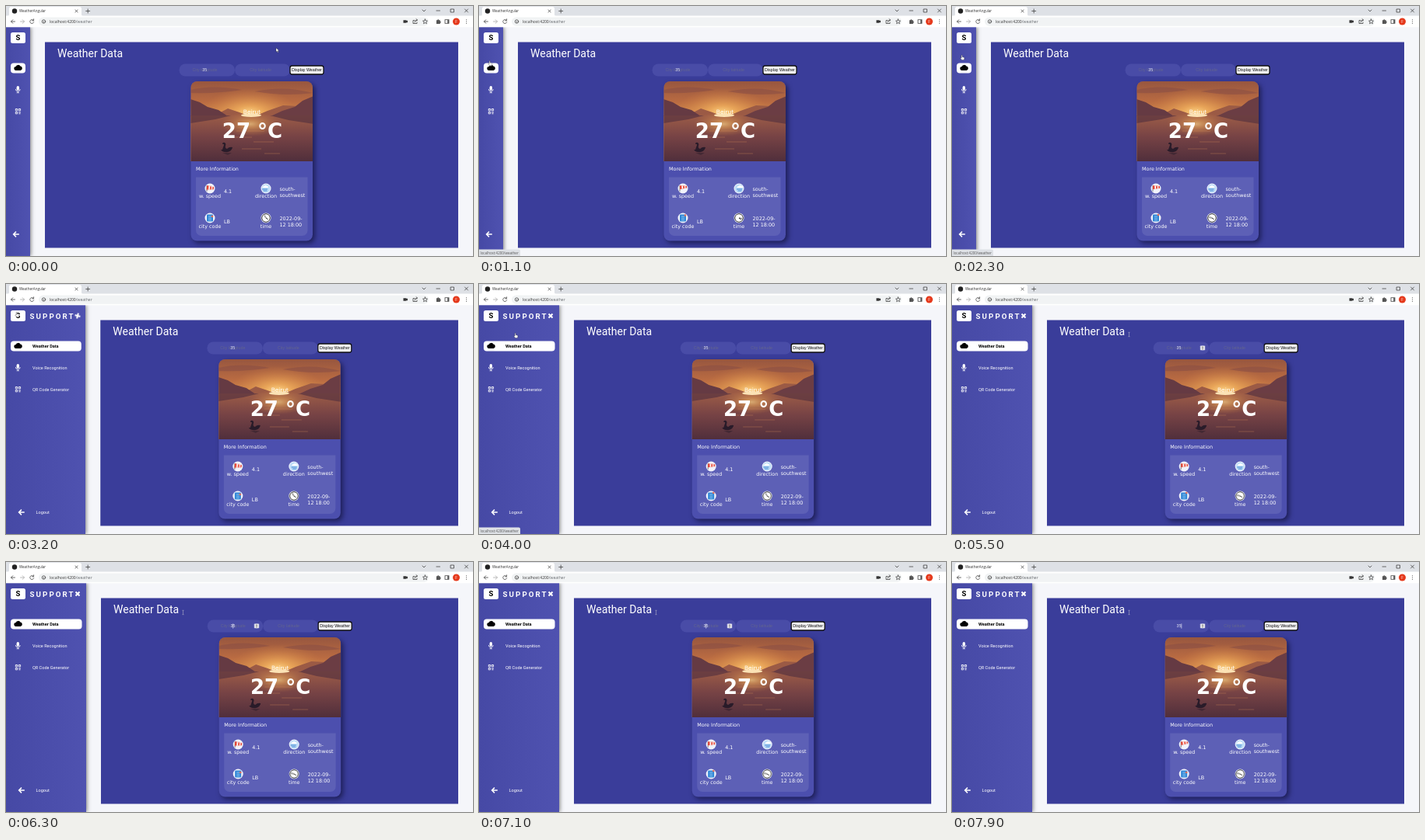
An HTML page that plays this animation: 600 by 322 pixels, repeating every 8 s.

```html
<!DOCTYPE html>
<html lang="en">
<head>
<meta charset="utf-8">
<title>WeatherAngular</title>
<style>
/* --open runs from 0 (sidebar collapsed) to 1 (expanded) */
@property --open { syntax: "<number>"; inherits: true; initial-value: 0; }

html, body { margin: 0; width: 100%; height: 100%; overflow: hidden; }
#stage {
  position: relative; width: 600px; height: 322px; overflow: hidden;
  background: #f5f6fa; animation: open 8s linear infinite;
}
svg { position: absolute; left: 0; top: 0; display: block; }
text { white-space: pre; }

@keyframes open {
  0%, 33.5% { --open: 0; animation-timing-function: ease; }
  41%, 100% { --open: 1; }
}

/* page */
.panel { x: calc(50px + 72px * var(--open)); width: calc(531px - 72px * var(--open)); }
.heading { transform: translateX(calc(72px * var(--open))); font: 14px Roboto, sans-serif; fill: #fff; }
.middle { transform: translateX(calc(36.2px * var(--open))); }
.form { font: 5.3px "Liberation Sans", Arial, sans-serif; text-anchor: middle; }
.card { filter: drop-shadow(3px 3px 3px rgba(0, 0, 20, .5)); }
.info { font: 6.4px "DejaVu Sans", Verdana, sans-serif; fill: #fff; }
.mid { text-anchor: middle; }

/* sidebar */
#side {
  position: absolute; left: 0; top: 27px; height: 295px; overflow: hidden;
  width: calc(31px + 72px * var(--open));
  background: linear-gradient(90deg, #4649a5, #4f52b0);
}
#shade {
  position: absolute; left: 0; top: 27px; height: 295px;
  width: calc(31px + 72px * var(--open));
  box-shadow: 1px 0 5px rgba(0, 0, 0, .5);
}
.pill { width: calc(19px + 72.5px * var(--open)); }
.labels { opacity: var(--open); font: 5.55px Roboto, sans-serif; fill: #fff; }
.back { transform: translateX(calc(7px * var(--open))); }
.close { transform-origin: 92px 41px; animation: spin 8s linear infinite; }
@keyframes spin {
  0%, 33.5% { transform: rotate(-180deg); animation-timing-function: ease-out; }
  43.5%, 100% { transform: none; }
}

/* browser */
.ui { font: 5px "Open Sans", "Noto Sans", sans-serif; fill: #333; }
.line { fill: none; stroke: #444; stroke-width: .8; stroke-linecap: round; }
.status { animation: status 8s step-end infinite; }
@keyframes status {
  0% { opacity: 0; } 11.25% { opacity: 1; } 33.5% { opacity: 0; }
  46.25% { opacity: 1; } 58.5%, 100% { opacity: 0; }
}

/* number field */
.hint { animation: hint 8s step-end infinite; }
@keyframes hint { 0% { opacity: 1; } 92.5%, 100% { opacity: 0; } }
.spinner { animation: spinner 8s step-end infinite; }
@keyframes spinner { 0% { opacity: 0; } 60%, 100% { opacity: 1; } }
.first { animation: first 8s step-end infinite; }
@keyframes first { 0% { opacity: 0; } 92.5% { opacity: 1; } 95%, 100% { opacity: 0; } }
.both { animation: both 8s step-end infinite; }
@keyframes both { 0% { opacity: 0; } 95%, 100% { opacity: 1; } }
.caret { animation: caret 8s step-end infinite; }
@keyframes caret {
  0% { opacity: 0; transform: none; }
  61.25% { opacity: 1; } 67.5% { opacity: 0; }
  73.75% { opacity: 1; } 80% { opacity: 0; }
  86.25% { opacity: 1; transform: none; }
  92.5% { opacity: 1; transform: translateX(1.6px); }
  95%, 100% { opacity: 1; transform: translateX(3.1px); }
}

/* badge icons */
.hand { transform-origin: 334px 273px; animation: turn .8s linear infinite; }
@keyframes turn { from { transform: rotate(-30deg); } to { transform: rotate(330deg); } }
.sock { transform-origin: 258px 233px; animation: wave 1.6s ease-in-out infinite alternate; }
@keyframes wave { from { transform: rotate(6deg); } to { transform: rotate(-6deg) scaleY(.8); } }
.gust { animation: gust 1s ease-in-out infinite alternate; }
@keyframes gust { from { transform: translateX(-1px); } to { transform: translateX(1px); } }
.pin { animation: hop .8s ease-in-out infinite alternate; }
@keyframes hop { from { transform: translateY(1px); } to { transform: translateY(-1px); } }

/* pointer */
.pointer { animation: move 8s ease-in-out infinite; }
@keyframes move {
  0%, 1.25% { transform: translate(347px, 54px); }
  11.25% { transform: translate(13px, 71px); }
  22.5% { transform: translate(13px, 66px); }
  28.75%, 30% { transform: translate(12px, 63px); }
  33.5% { transform: translate(13px, 36px); }
  41.25% { transform: translate(13px, 36px); }
  46.25% { transform: translate(38px, 62px); }
  50%, 57.5% { transform: translate(46px, 63px); }
  61.25% { transform: translate(290px, 80px); }
  67%, 100% { transform: translate(227px, 62px); }
}
.arrow { animation: arrow 8s step-end infinite; }
@keyframes arrow { 0% { opacity: 1; } 10% { opacity: 0; } 58.5% { opacity: 1; } 60%, 100% { opacity: 0; } }
.finger { animation: finger 8s step-end infinite; }
@keyframes finger { 0% { opacity: 0; } 10% { opacity: 1; } 58.5%, 100% { opacity: 0; } }
.beam { animation: beam 8s step-end infinite; }
@keyframes beam { 0% { opacity: 0; } 60%, 100% { opacity: 1; } }
</style>
</head>
<body>
<div id="stage">

<svg width="600" height="322" viewBox="0 0 600 322">
  <defs>
    <linearGradient id="sky" x1="0" y1="0" x2="0" y2="1">
      <stop offset="0" stop-color="#97563f"/>
      <stop offset=".25" stop-color="#b96b42"/>
      <stop offset=".42" stop-color="#d28a4c"/>
    </linearGradient>
    <linearGradient id="lake" x1="0" y1="0" x2="0" y2="1">
      <stop offset="0" stop-color="#9c5c47"/>
      <stop offset=".45" stop-color="#774345"/>
      <stop offset="1" stop-color="#4f2e3b"/>
    </linearGradient>
    <radialGradient id="glow">
      <stop offset="0" stop-color="#ffd98a"/>
      <stop offset=".3" stop-color="#f0ae5c" stop-opacity=".8"/>
      <stop offset="1" stop-color="#d08042" stop-opacity="0"/>
    </radialGradient>
    <clipPath id="frame"><path d="M237.500 200V105a8 8 0 0 1 8-8h140.500a8 8 0 0 1 8 8V200z"/></clipPath>
  </defs>

  <rect class="panel" y="46.500" height="265" fill="#3a3d9a"/>
  <text class="heading" x="66" y="66">Weather Data</text>

  <g class="middle">
    <g class="form">
      <g fill="#494ca7">
        <rect x="222.500" y="74.500" width="71.500" height="16" rx="8"/>
        <rect x="294" y="74.500" width="71" height="16" rx="8"/>
      </g>
      <g fill="#62648f">
        <text class="hint" x="255.500" y="84.300">City longitude</text>
        <text x="327" y="84.300">City latitude</text>
      </g>
      <g class="spinner">
        <rect x="282.800" y="79.600" width="6" height="5.600" rx=".6" fill="#f3f3f6"/>
        <path d="M284.400 81.900l1.400-1.300 1.400 1.300zM284.400 83l1.400 1.300 1.400-1.300z" fill="#444"/>
      </g>
      <g fill="#e4e5f5">
        <text class="first" x="255.300" y="84.300">3</text>
        <text class="both" x="255.300" y="84.300">35</text>
      </g>
      <rect class="caret" x="255.300" y="79.400" width=".7" height="6.200" fill="#e4e5f5"/>
      <rect x="365" y="77" width="43" height="11" rx="2.500" fill="#f2f2f4" stroke="#111" stroke-width="1.300"/>
      <text x="386.500" y="84.300" fill="#111">Display Weather</text>
    </g>

    <rect class="card" x="237.500" y="97" width="156.500" height="205.500" rx="8" fill="#4c4fae"/>

    <g clip-path="url(#frame)">
      <rect x="237" y="97" width="158" height="104" fill="url(#sky)"/>
      <ellipse cx="313" cy="138" rx="62" ry="32" fill="url(#glow)"/>
      <g fill="#8a4f45" opacity=".6">
        <path d="M237 108q30-7 66 0q-30 5-66 4z"/>
        <path d="M320 110q38-8 74 2q-36 5-74-2z"/>
      </g>
      <path d="M268 141l17-9 15 5 10 4zM322 141l14-6 20-7 38 2v13z" fill="#9b5a45"/>
      <path d="M237 120l12 4 10 6 14 4 12 8h-48z" fill="#653a43"/>
      <path d="M395 116l-14 6-10 8-16 5-15 7h55z" fill="#6b3d44"/>
      <rect x="237" y="141" width="158" height="60" fill="url(#lake)"/>
      <ellipse cx="314" cy="152" rx="38" ry="16" fill="url(#glow)" opacity=".65"/>
      <ellipse cx="315" cy="140.800" rx="13" ry="2.200" fill="#fbe2b4"/>
      <path d="M237 141h52l-20 5-32 5zM395 141h-56l24 6 32 5z" fill="#5b343f" opacity=".75"/>
      <g stroke="#d78f59" stroke-width=".7" opacity=".5">
        <path d="M296 161h36M288 169h28M318 175h26M303 184h25M332 190h20"/>
      </g>
      <path d="M276 185q3 4 9 3q5-1 6-6q-4-1-7 2q-3-1-2-4q1-3-1-4q-3-1-3 2q2-1 2 1q-1 3-2 6z" fill="#291b29"/>
      <path d="M278 189h12l-5 3z" fill="#3a2430" opacity=".7"/>
    </g>

    <g class="info">
      <g class="mid">
        <text x="316" y="139" font-size="7.400">Beirut</text>
        <text x="316.500" y="169.500" font-size="26" font-weight="bold">27 °C</text>
      </g>
      <text x="244" y="212">More Information</text>
      <path d="M244 220.500H387.500V289a7 7 0 0 1-7 7H251a7 7 0 0 1-7-7z" fill="#5d60b6"/>
      <g class="mid">
        <text x="262" y="247.300">w. speed</text>
        <text x="334" y="247.300">direction</text>
        <text x="262" y="286">city code</text>
        <text x="334" y="286">time</text>
      </g>
      <text x="280" y="241">4.1</text>
      <text x="351.500" y="237.500">south-</text>
      <text x="351.500" y="245.500">southwest</text>
      <text x="280" y="280">LB</text>
      <text x="351.500" y="276">2022-09-</text>
      <text x="351.500" y="284">12 18:00</text>
    </g>

    <g fill="#f1f3fb">
      <circle cx="262" cy="235" r="6.500"/>
      <circle cx="334" cy="235" r="6.500"/>
      <circle cx="262" cy="273" r="6.500"/>
      <circle cx="334" cy="273" r="6.500"/>
    </g>
    <path d="M258 231v8" stroke="#555" stroke-width=".7"/>
    <g class="sock">
      <path d="M258 231l9 1.200v3l-9 1.600z" fill="#e5402f"/>
      <path d="M260.400 231.300l1.800.2v4.600l-1.800.3zM264 231.800l1.300.2v3.600l-1.300.2z" fill="#fff"/>
    </g>
    <circle cx="334" cy="235" r="5.500" fill="#bcdcf7"/>
    <g class="gust">
      <path d="M330.500 234q0-2 2-2q2-2 4 0q2 0 1.500 2z" fill="#fff"/>
      <path d="M330 236h7M331.500 238h5" stroke="#397fce" stroke-width=".9"/>
    </g>
    <rect x="258" y="268.500" width="8" height="9" rx="1" fill="#2f86d6"/>
    <path d="M260 271h4M260 273.300h4M260 275.600h4" stroke="#a9d5f7" stroke-width=".8"/>
    <circle class="pin" cx="265" cy="270" r="1.300" fill="#e46a55"/>
    <circle cx="334" cy="273" r="5.300" fill="#fff" stroke="#333" stroke-width="1"/>
    <path d="M334 273l2.600 1.800" stroke="#222" stroke-width="1"/>
    <path class="hand" d="M334 273v-4.200" stroke="#222" stroke-width=".8"/>
  </g>
</svg>

<div id="shade"></div>
<div id="side">
  <svg width="104" height="295" viewBox="0 27 104 295">
    <rect x="6" y="34" width="19" height="14" rx="2.500" fill="#fff"/>
    <text x="15.500" y="44.300" text-anchor="middle" font-family="Roboto, sans-serif" font-weight="bold" font-size="9.500">S</text>
    <rect class="pill" x="6" y="73.500" height="13" rx="4" fill="#fff"/>
    <path d="M13 83a2.500 2.500 0 0 1-.3-5a3.200 3.200 0 0 1 5.800-.5a2.800 2.800 0 0 1 .1 5.500z"/>
    <g fill="#fff">
      <rect x="13.600" y="103" width="3.400" height="5.800" rx="1.700"/>
      <path d="M12.400 107a2.900 2.900 0 0 0 5.800 0M15.300 110v1.700M13.600 111.700h3.400" fill="none" stroke="#fff" stroke-width=".8"/>
    </g>
    <g fill="none" stroke="#fff" stroke-width=".9">
      <path d="M12.300 132.500h2.300v2.300h-2.300zM16.300 132.500h2.300v2.300h-2.300zM12.300 136.500h2.300v2.300h-2.300z"/>
      <path d="M16 137h3M16.500 138.800h2"/>
    </g>
    <path class="back" d="M16.800 294H10M13 290.600L9.600 294l3.400 3.400" fill="none" stroke="#fff" stroke-width="1.500"/>
    <g class="labels">
      <text x="30.500" y="44.800" font-size="9.700" font-weight="bold" letter-spacing="2.100">SUPPORT</text>
      <path class="close" d="M89.500 38.500l5 5M94.500 38.500l-5 5" stroke="#fff" stroke-width="2"/>
      <text x="34" y="82" fill="#000" font-weight="bold">Weather Data</text>
      <text x="34" y="110">Voice Recognition</text>
      <text x="34" y="138">QR Code Generator</text>
      <text x="38.500" y="296">Logout</text>
    </g>
  </svg>
</div>

<svg width="600" height="322" viewBox="0 0 600 322">
  <g class="ui">
    <rect width="600" height="13" fill="#dee1e6"/>
    <rect y="12.500" width="600" height="14.800" fill="#fff"/>
    <path d="M2 13q2 0 2-2V3.500q0-2.500 2.500-2.500H94.500q2.500 0 2.500 2.500V11q0 2 2 2z" fill="#fff"/>
    <circle cx="11" cy="6.500" r="3.200" fill="#222"/>
    <text x="17" y="8.300" font-size="4.500">WeatherAngular</text>
    <g class="line">
      <path d="M89 5l3 3M92 5l-3 3M102.700 6.500h5M105.200 4v5"/>
      <path d="M535 5l2 2 2-2M553 6h4.500M571.500 4h4v4h-4zM589.500 4l4 4M593.500 4l-4 4"/>
      <path d="M11.500 20h-5M8.800 17.700L6.500 20l2.300 2.300"/>
      <path d="M18.500 20h5M21.200 17.700l2.300 2.300-2.300 2.300" stroke="#aaa"/>
      <path d="M35.300 18.500a2.500 2.500 0 1 0 .4 2.300M35.600 16.800v2h-2"/>
    </g>
    <rect x="42" y="14.500" width="501" height="11.200" rx="5.600" fill="#f1f3f4"/>
    <circle class="line" cx="48.500" cy="20" r="2.200"/>
    <path class="line" d="M48.500 20v1"/>
    <text x="56" y="21.900">localhost:4200<tspan fill="#686c70">/weather</tspan></text>
    <path d="M510.500 18.300h4v1l1.500-.8v3l-1.500-.8v1h-4z"/>
    <g class="line" stroke="#666">
      <path d="M525 18.500h-2v4h5v-1.500M525 21q0-3 3.500-3M527 16.700l1.500 1.300-1.500 1.300"/>
      <path d="M538.500 17l.9 2 2.100.2-1.600 1.400.5 2.100-1.900-1.100-1.900 1.100.5-2.100-1.600-1.400 2.100-.2z"/>
      <rect x="564" y="17.700" width="5" height="4.600"/>
    </g>
    <path d="M553 18.200h1.300a1 1 0 0 1 2 0h1.500v1.500a1 1 0 0 1 0 2v1.300h-4.800z" fill="#555"/>
    <path d="M567.200 18h1.800v4.200h-1.800z" fill="#555"/>
    <circle cx="578.500" cy="20" r="4.500" fill="#e5391c"/>
    <text x="578.500" y="21.600" text-anchor="middle" font-size="4.500" fill="#fff">F</text>
    <path d="M591.500 17.800v.01M591.500 20v.01M591.500 22.200v.01" stroke="#444" stroke-width="1.100" stroke-linecap="round"/>
    <g class="status">
      <path d="M0 313.500H51q2 0 2 2V322H0z" fill="#dee1e6"/>
      <text x="1.500" y="319.500" font-size="4.500" fill="#555">localhost:4200/weather</text>
    </g>
  </g>

  <g class="pointer">
    <path class="arrow" d="M0 0v5l1.200-1 .9 1.900.9-.4-.8-1.800 1.600-.1z" fill="#fff" stroke="#222" stroke-width=".35"/>
    <path class="finger" d="M.1.500q.6-.7 1.100 0v2.100l2.200.6q.7.400.5 1.200l-.5 2H.600l-1.900-2.300q.2-.8 1.400 0z" fill="#fff" stroke="#222" stroke-width=".35"/>
    <path class="beam" d="M-.6.300h2.200M.5.300v5.400M-.6 5.700h2.200" stroke="#a9aac6" stroke-width=".6"/>
  </g>
</svg>
</div>
</body>
</html>
```
